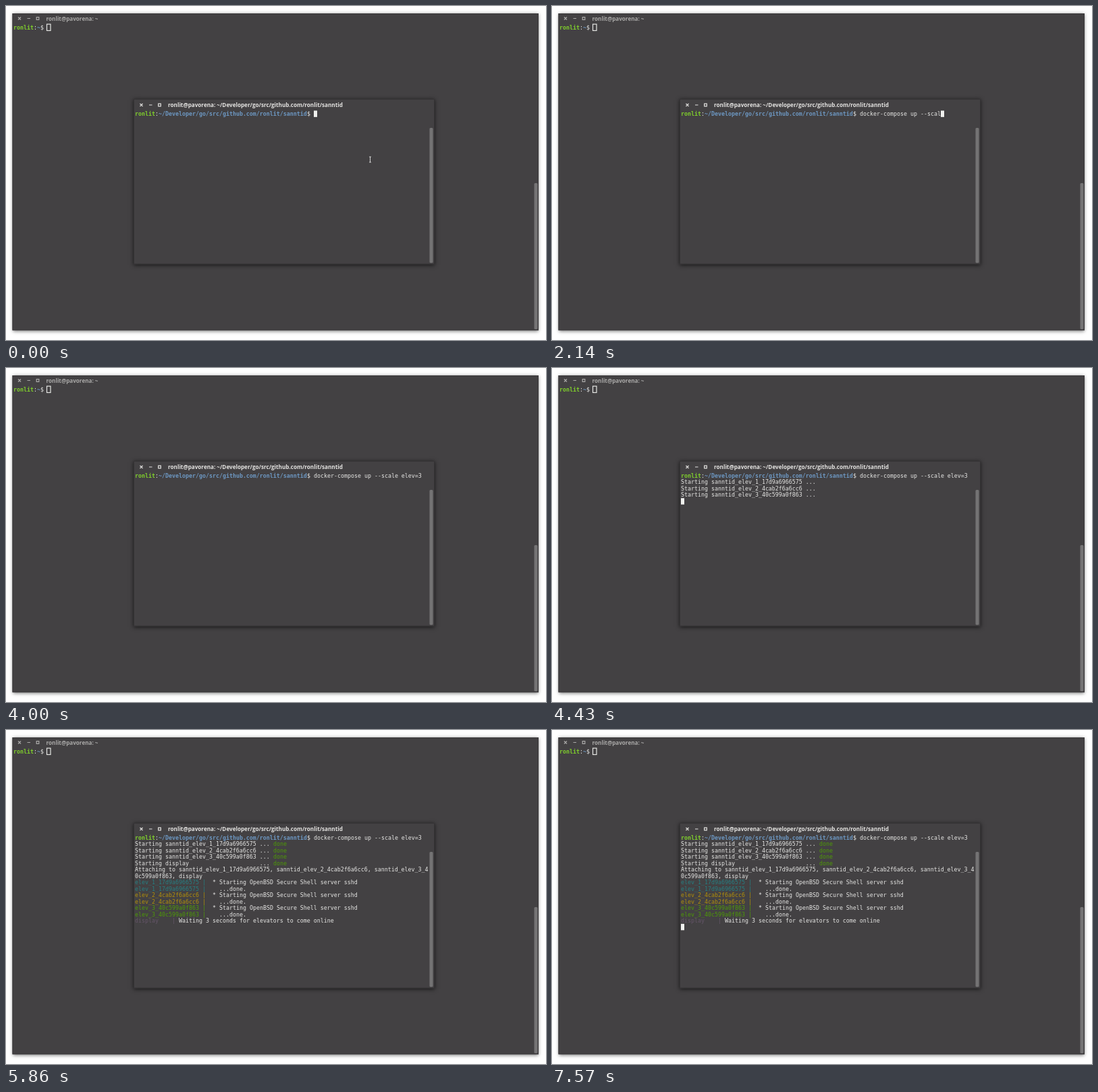
Write an HTML page with a canvas that moves like this. It is 800x496 px and loops after 8000 ms.

```html
<!DOCTYPE html>
<html lang="en">
<head>
<meta charset="utf-8">
<title>Terminal</title>
<style>
html, body { margin: 0; width: 100%; height: 100%; overflow: hidden; background: #fff; }
canvas { display: block; }
</style>
</head>
<body>
<canvas id="stage" width="800" height="496"></canvas>
<script>
const ctx = document.getElementById('stage').getContext('2d');
const LOOP = 8000, CELL = 5, ROW = 9.46, LEFT = 191, TOP = 155.4;
const BG = '#434143', WHITE = '#e6e6e4', LIME = '#80d02c', BLUE = '#6d98c3', GREEN = '#4e9a06';
const MONO = '8.305px "DejaVu Sans Mono", monospace';
const TITLE = 'bold 8.13px "Open Sans", sans-serif';
const USER = 'ronlit', HOST = 'pavorena';
const PATH = `~/Developer/go/src/github.com/${USER}/sanntid`;
const COMMAND = 'docker-compose up --scale elev=3';
const PROMPT_COLS = USER.length + PATH.length + 3;

// [time, characters typed]
const typing = [[0, 0], [140, 2], [280, 4], [430, 5], [570, 7], [710, 9], [860, 11], [1000, 13],
  [1140, 14], [1290, 15], [1430, 17], [1570, 19], [1860, 20], [2000, 22], [2140, 24], [2290, 25],
  [2430, 26], [2570, 27], [2710, 28], [2860, 30], [3000, 31], [3290, 32]];
// [time, row of the cursor, or -1 while hidden]
const cursorRows = [[0, 0], [3570, 1], [3860, -1], [4430, 4], [4710, -1], [4860, 4], [5140, -1],
  [6140, 14], [6430, -1], [6860, 14], [7140, -1], [7570, 14]];

// Output pieces: [time, row, column, text, colour]
const output = [];
const print = (...piece) => output.push(piece);
const elevators = [
  ['elev_1_17d9a6966575', '#267f82', 4710, 5570],
  ['elev_2_4cab2f6a6cc6', '#b08f0a', 4860, 5710],
  ['elev_3_40c599a0f863', GREEN, 5280, 5710]
];
elevators.forEach(([name, color, done, online], i) => {
  const row = 7 + 2 * i;
  print(4140, 1 + i, 0, `Starting sanntid_${name} ...`, WHITE);
  print(done, 1 + i, 41, 'done', GREEN);
  print(online, row, 0, name + ' |', color);
  print(online, row, 23, '* Starting OpenBSD Secure Shell server sshd', WHITE);
  print(online, row + 1, 0, name + ' |', color);
  print(online, row + 1, 25, '...done.', WHITE);
});
print(5280, 4, 0, 'Starting display'.padEnd(37) + '...', WHITE);
print(5430, 4, 41, 'done', GREEN);
const attached = 'Attaching to ' + elevators.map(([name]) => 'sanntid_' + name).join(', ') + ', display';
print(5430, 5, 0, attached.slice(0, 87), WHITE);
print(5430, 6, 0, attached.slice(87), WHITE);
print(5860, 13, 0, 'display    |', '#655569');
print(5860, 13, 13, 'Waiting 3 seconds for elevators to come online', WHITE);

const latest = (steps, t) => steps.filter(([time]) => time <= t).pop()[1];

function text(str, x, y, color, font = MONO) {
  ctx.font = font;
  ctx.fillStyle = color;
  ctx.fillText(str, x, y);
}

function rect(x, y, w, h, color) {
  ctx.fillStyle = color;
  ctx.fillRect(x, y, w, h);
}

function bar(x, y, w, h) {
  ctx.fillStyle = '#747374';
  ctx.beginPath();
  ctx.roundRect(x, y, w, h, 1.5);
  ctx.fill();
}

function frame(x, y, w, h, blur, shadow, edge) {
  ctx.save();
  ctx.shadowColor = shadow;
  ctx.shadowBlur = blur;
  ctx.shadowOffsetY = 1;
  rect(x, y, w, h, BG);
  ctx.restore();
  ctx.strokeStyle = edge;
  ctx.lineWidth = 1;
  ctx.strokeRect(x + .5, y + .5, w - 1, h - 1);
}

function titleBar(x, y, label, color) {
  ctx.strokeStyle = color;
  ctx.lineWidth = 1.2;
  ctx.beginPath();
  ctx.moveTo(x - 2, y - 2); ctx.lineTo(x + 2, y + 2);
  ctx.moveTo(x + 2, y - 2); ctx.lineTo(x - 2, y + 2);
  ctx.moveTo(x + 11.5, y); ctx.lineTo(x + 16, y);
  ctx.rect(x + 25.2, y - 1.8, 3.6, 3.6);
  ctx.stroke();
  text(label, x + 39.5, y + 3.2, color, TITLE);
}

function prompt(x, y, path) {
  const bold = 'bold ' + MONO;
  const at = col => x + col * CELL;
  text(USER, x, y, LIME, bold);
  text(':', at(USER.length), y, WHITE);
  text(path, at(USER.length + 1), y, BLUE, bold);
  text('$', at(USER.length + 1 + path.length), y, WHITE);
}

function pointer(x, y) {
  ctx.strokeStyle = '#d0d0d0';
  ctx.lineWidth = 1;
  ctx.beginPath();
  ctx.moveTo(x - 1.5, y - 4); ctx.lineTo(x + 1.5, y - 4);
  ctx.moveTo(x, y - 4); ctx.lineTo(x, y + 4);
  ctx.moveTo(x - 1.5, y + 4); ctx.lineTo(x + 1.5, y + 4);
  ctx.stroke();
}

function draw(t) {
  rect(0, 0, 800, 496, '#fefefe');

  frame(9.5, 11, 779.5, 470.5, 5, 'rgba(0,0,0,.55)', '#3b393b');
  titleBar(20, 18.5, `${USER}@${HOST}: ~`, '#aaa9a8');
  prompt(11, 34.8, '~');
  ctx.strokeStyle = WHITE;
  ctx.strokeRect(60.5, 27, 5.5, 9.5);
  bar(782.5, 263, 5, 217);

  frame(189, 138, 446, 245.5, 6, 'rgba(0,0,0,.65)', '#353335');
  titleBar(200.5, 147, `${USER}@${HOST}: ${PATH}`, '#e4e3e1');
  bar(627.5, 181, 5, 200.5);
  prompt(LEFT, TOP + 7.6, PATH);

  const typed = latest(typing, t);
  text(COMMAND.slice(0, typed), LEFT + PROMPT_COLS * CELL, TOP + 7.6, WHITE);
  for (const [time, row, col, str, color] of output) {
    if (t >= time) text(str, LEFT + col * CELL, TOP + 7.6 + row * ROW, color);
  }

  const row = latest(cursorRows, t);
  if (row >= 0) {
    const col = row ? 0 : PROMPT_COLS + typed;
    rect(LEFT + col * CELL, TOP + row * ROW, CELL, ROW, '#f0f0ee');
  }
  if (t < 140) pointer(539.5, 228);
}

function tick() {
  draw(performance.now() % LOOP);
  requestAnimationFrame(tick);
}
tick();
</script>
</body>
</html>
```
